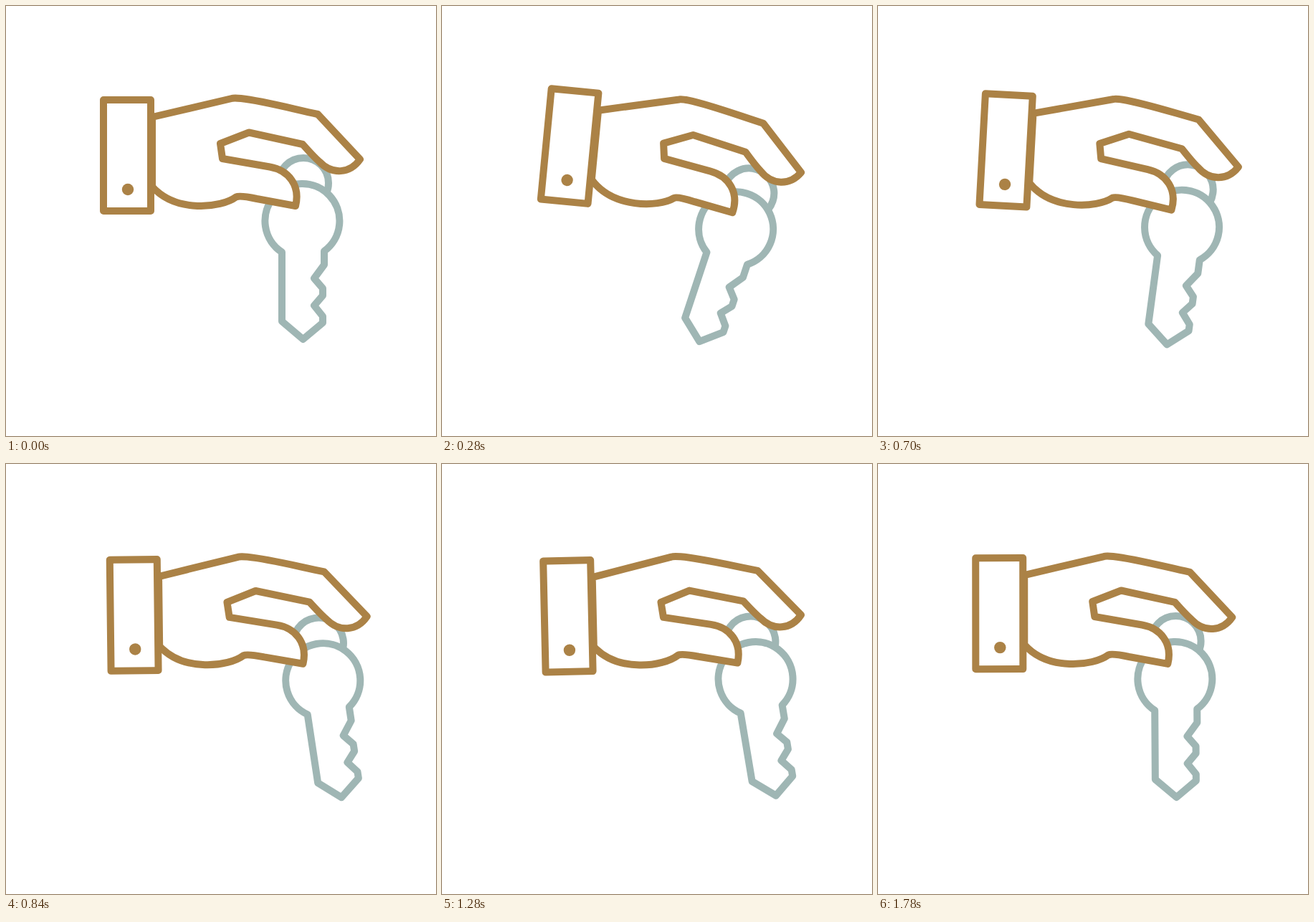
An HTML page for the animation above (1800 ms loop, 600 by 600 pixels).

```html
<!DOCTYPE html>
<html lang="en">
<head>
<meta charset="utf-8">
<title>Hand with key</title>
<style>
  html, body { margin: 0; width: 100%; height: 100%; overflow: hidden; background: #fff; }
  svg { display: block; width: 100%; height: 100%; }
  g { fill: #fff; stroke-width: 10; stroke-linejoin: round; stroke-linecap: round; }
  .key { stroke: #9fb6b4; }
  .hand { stroke: #ab8246; }
  .button { fill: #ab8246; stroke: none; }
</style>
</head>
<body>
<svg viewBox="0 0 600 600">
  <g id="arm">
    <g id="key" class="key">
      <circle cx="415" cy="247" r="35"/>
      <path d="M385 343.5A52 52 0 1 1 444 342V361L430 380L442 394V404L430 418L442 433V442L414.5 465L385 440Z"/>
    </g>
    <g class="hand">
      <path d="M204 155L315 129Q318 128 328 129C356 132 390 141 435 151L494 214
        C480 234 455 236 437 217Q430 211 414 193L339 176.5L299 192L302 213L368 224.5
        C394 229 411 250 404 279L350 269Q326 264 321 266.5C300 282 237 289 204 252Z"/>
      <rect x="136" y="131" width="66" height="155"/>
      <circle class="button" cx="170" cy="256" r="8.2"/>
    </g>
  </g>
</svg>
<script>
  const LOOP = 1800, STEP = 20;
  const arm = document.getElementById('arm');
  const key = document.getElementById('key');

  // Pose: arm angle, arm x, arm y, key angle, key x, key y
  const rest = [0, 0, 0, 0, 0, 0];
  const back = [6, 0, 0, 14, 0, 0];
  const forth = [-1.8, 12.5, 1, -11.7, 19.7, 4.6];

  // The last swing is still settling when the loop restarts.
  const swings = [
    { start: 0, length: 430, from: rest, to: back },
    { start: 600, length: 430, from: back, to: forth },
    { start: 1110, length: 850, from: forth, to: rest }
  ];

  const bezier = (a, b, s) => 3 * a * s * (1 - s) ** 2 + 3 * b * s * s * (1 - s) + s ** 3;

  function ease(u) {
    if (u <= 0) return 0;
    if (u >= 1) return 1;
    let lo = 0, hi = 1;
    for (let i = 0; i < 24; i++) {
      const mid = (lo + hi) / 2;
      if (bezier(0.25, 0.25, mid) < u) lo = mid; else hi = mid;
    }
    return bezier(0.1, 1, lo);
  }

  function place(el, angle, x, y, px, py) {
    el.setAttribute('transform', `translate(${x} ${y}) rotate(${angle} ${px} ${py})`);
  }

  function draw(t) {
    const swing = swings.filter(s => s.start <= t).pop();
    const p = ease((t - swing.start) / swing.length);
    const pose = swing.from.map((v, i) => v + (swing.to[i] - v) * p);
    place(arm, ...pose.slice(0, 3), 308, 297);
    place(key, ...pose.slice(3), 406, 290);
  }

  const origin = performance.now();
  function tick() {
    const t = (performance.now() - origin) % LOOP;
    draw(Math.floor(t / STEP) * STEP);
    requestAnimationFrame(tick);
  }
  tick();
</script>
</body>
</html>
```
